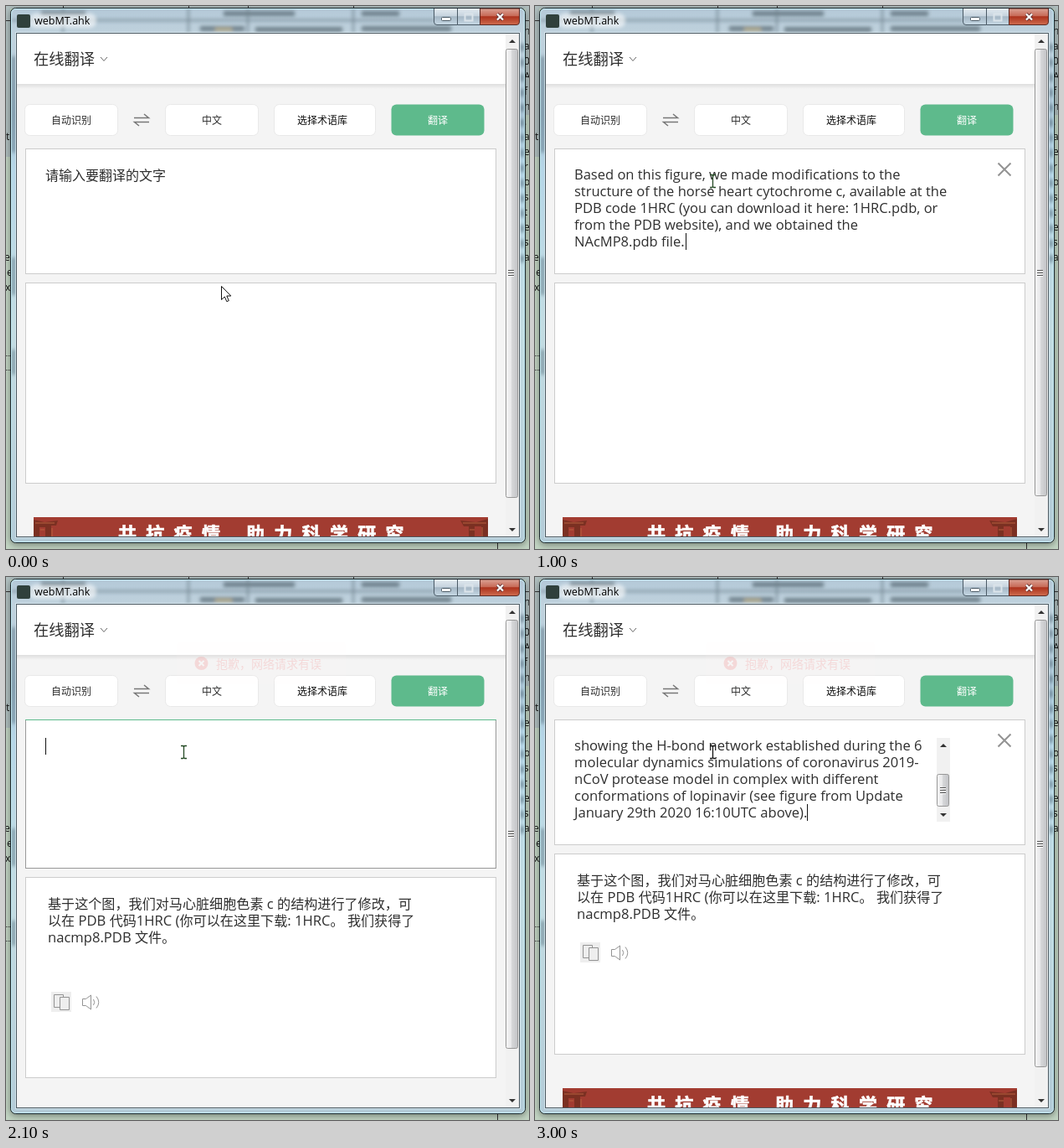
Write an HTML page that moves like this. It is 625 px wide and 648 px high and loops after 3100 ms.

```html
<!DOCTYPE html>
<html lang="zh-CN">
<head>
<meta charset="utf-8">
<title>webMT.ahk</title>
<style>
  html, body { margin: 0; width: 100%; height: 100%; overflow: hidden; background: #c3d6c4; }
  svg { display: block; width: 625px; height: 648px; }
  text { font-family: "Open Sans", "Noto Sans CJK SC", "Noto Sans CJK", sans-serif; fill: #2e2e2e; white-space: pre; }
  .small { font-size: 12px; }
  .copy { font-size: 16.5px; }
  .second .copy { font-size: 16.6px; }
  .cjk { font-size: 16px; }
  .result .cjk { font-size: 16.1px; }
  .cjk .latin { font-size: 16.6px; }
  .slogan { font-size: 22px; font-weight: 900; letter-spacing: 11.3px; fill: #fff; stroke: #fff; stroke-width: .7; }
  .line { fill: none; stroke: #939393; }
  .caret { fill: #111; }
  .desk { font-size: 12px; fill: #111; }

  .a { animation: 3100ms step-end infinite; }
  .show { opacity: 0; }

  .arrow { animation-name: arrow; }
  @keyframes arrow { 0% { opacity: 1 } 6.45% { opacity: 0 } }
  .ibeam { animation-name: ibeam; stroke: #244a24; }
  @keyframes ibeam { 6.45% { opacity: 1 } 77.41% { opacity: 1; stroke: #111 } }
  .hint { animation-name: hint; }
  @keyframes hint { 0% { opacity: 1 } 9.67% { opacity: 0 } }
  .focus { animation-name: focus; }
  @keyframes focus { 9.67% { opacity: 1 } 32.25% { opacity: 0 } 67.74% { opacity: 1 } 96.77% { opacity: 0 } }
  .caret-empty { animation-name: caretEmpty; }
  @keyframes caretEmpty { 9.67% { opacity: 1 } 29.03% { opacity: 0 } 67.74% { opacity: 1 } 90.32% { opacity: 0 } }
  .first { animation-name: first; }
  @keyframes first {
    29.03% { opacity: 1 }
    45.16% { opacity: 1; transform: translateY(1px) }
    67.74% { opacity: 0 }
  }
  .caret-first { animation-name: caretFirst; }
  @keyframes caretFirst { 29.03% { opacity: 1 } 48.38% { opacity: 0 } }
  .second { animation-name: second; }
  @keyframes second { 90.32% { opacity: 1 } }
  .clear { animation-name: clear; }
  @keyframes clear { 32.25% { opacity: 1 } 67.74% { opacity: 0 } 96.77% { opacity: 1 } }
  .result { animation-name: result; }
  @keyframes result { 61.29% { opacity: 1 } }
  .speaker { animation-name: speaker; }
  @keyframes speaker { 64.51% { opacity: 1 } }
  .toast { animation-name: toast; }
  @keyframes toast { 67.74% { opacity: .2 } }

  .input { animation-name: input; height: 149px; stroke: #ccc; }
  @keyframes input {
    9.67% { height: 149px; stroke: #999 }
    32.25% { height: 149px; stroke: #ccc }
    45.16% { height: 177px; stroke: #ccc }
    67.74% { height: 177px; stroke: #999 }
    70.96% { height: 151px; stroke: #999 }
    90.32% { height: 149px; stroke: #999 }
    96.77% { height: 149px; stroke: #ccc }
  }
  .below { animation-name: below; }
  @keyframes below {
    45.16% { transform: translateY(28px) }
    70.96% { transform: translateY(2px) }
    90.32% { transform: none }
  }
  .tools { animation-name: tools; }
  @keyframes tools {
    61.29% { transform: translateY(31px) }
    70.96% { transform: translateY(5px) }
    90.32% { transform: none }
  }
  .thumb { animation-name: thumb; height: 535px; }
  @keyframes thumb {
    12.9% { height: 533px }
    45.16% { height: 511px }
    70.96% { height: 533px }
  }
  .grip { animation-name: grip; }
  @keyframes grip {
    45.16% { transform: translateY(-12px) }
    70.96% { transform: translateY(-1px) }
    90.32% { transform: none }
  }
</style>
</head>
<body>
<svg viewBox="0 0 625 648">
  <defs>
    <linearGradient id="glass" x2="0" y2="1">
      <stop offset="0" stop-color="#b4c9d8"/>
      <stop offset=".05" stop-color="#c0d2dd"/>
      <stop offset=".2" stop-color="#a9c4d5"/>
      <stop offset=".3" stop-color="#b5d5e6"/>
      <stop offset=".6" stop-color="#c2dce2"/>
      <stop offset="1" stop-color="#b3cbd7"/>
    </linearGradient>
    <linearGradient id="red" x2="0" y2="1">
      <stop offset="0" stop-color="#dba294"/>
      <stop offset=".45" stop-color="#c76a57"/>
      <stop offset=".5" stop-color="#ac321c"/>
      <stop offset="1" stop-color="#cf6c4f"/>
    </linearGradient>
    <linearGradient id="button" x2="0" y2="1">
      <stop offset="0" stop-color="#e3ebf1"/>
      <stop offset=".45" stop-color="#c6d3de"/>
      <stop offset=".5" stop-color="#a5b7c5"/>
      <stop offset="1" stop-color="#c6d8e4"/>
    </linearGradient>
    <linearGradient id="bar">
      <stop offset="0" stop-color="#f5f5f5"/>
      <stop offset=".45" stop-color="#e8e8ea"/>
      <stop offset=".5" stop-color="#d6d7d9"/>
      <stop offset="1" stop-color="#c3c4c7"/>
    </linearGradient>
    <linearGradient id="shade" x2="0" y2="1">
      <stop offset="0" stop-color="#000" stop-opacity=".09"/>
      <stop offset="1" stop-color="#000" stop-opacity="0"/>
    </linearGradient>
    <filter id="blur" x="-20%" y="-60%" width="140%" height="220%"><feGaussianBlur stdDeviation="2.2"/></filter>
    <filter id="soft" x="-5%" y="-5%" width="110%" height="110%"><feGaussianBlur stdDeviation="4"/></filter>
    <clipPath id="frame"><rect x="6" y="3" width="614" height="637" rx="6"/></clipPath>
    <clipPath id="page"><rect x="13" y="33" width="584" height="600"/></clipPath>
    <g id="ridges"><path d="M-3-2.5h7M-3 .5h7M-3 3.5h7" stroke="#555"/><path d="M-3-1.5h7M-3 1.5h7M-3 4.5h7" stroke="#fff"/></g>
    <path id="up" d="M-4 2L0-2L4 2Z" fill="#333"/>
  </defs>

  <!-- desktop -->
  <rect width="625" height="648" fill="#c3d6c4"/>
  <path d="M0 0H625V130H621V3H5V180H0Z" fill="#b2c1c1"/>
  <path d="M68.500 0V4M218.500 0V4M289.500 0V4M415.500 0V4M0 17.500H6M620 17.500H625M587.500 641V648" stroke="#333"/>
  <path d="M0 417.500H6M0 434.500H6" stroke="#333" stroke-dasharray="1 1"/>
  <text class="desk"><tspan x="0" y="160">t</tspan><tspan x="-2" y="304">er</tspan><tspan x="-2" y="322">le</tspan><tspan x="-1" y="340">x</tspan></text>
  <text class="desk"><tspan x="619" y="34">n</tspan><tspan x="619" y="52">a</tspan><tspan x="619" y="70">0</tspan><tspan x="619" y="88">A</tspan><tspan x="619" y="106">f</tspan><tspan x="619" y="124">n</tspan><tspan x="619" y="142">.</tspan><tspan x="619" y="160">a</tspan><tspan x="619" y="178">e</tspan><tspan x="619" y="196">r</tspan><tspan x="619" y="214">o</tspan><tspan x="619" y="232">s</tspan><tspan x="619" y="250">t</tspan><tspan x="619" y="268">e</tspan><tspan x="619" y="286">s</tspan><tspan x="619" y="304">a</tspan></text>
  <rect x="5" y="4" width="616" height="639" rx="6" fill="#000" opacity=".42" filter="url(#soft)"/>

  <!-- window frame -->
  <g clip-path="url(#frame)">
    <rect x="6" y="3" width="614" height="637" fill="url(#glass)"/>
    <g filter="url(#blur)" opacity=".6">
      <path d="M6 17H512M68 3V32M218 3V32M289 3V32M415 3V32" stroke="#4d5f6a" stroke-width="2"/>
      <path d="M42 9H95M260 9H345M425 9H470M232 27H285M298 28H402M425 27H532" stroke="#43525c" stroke-width="6"/>
      <path d="M250 28H270" stroke="#a48b4e" stroke-width="4"/>
      <path d="M617 45V310" stroke="#4c6472" stroke-width="5" stroke-dasharray="9 9"/>
      <path d="M9 60V175M9 300V345M9 410V440" stroke="#54707f" stroke-width="5"/>
    </g>
    <rect x="28" y="9" width="80" height="17" rx="8" fill="#fff" opacity=".6" filter="url(#blur)"/>
  </g>
  <rect x="5.500" y="2.500" width="615" height="638" rx="6" fill="none" stroke="#1d282e"/>
  <rect x="6.500" y="3.500" width="613" height="636" rx="5" fill="none" stroke="#c9f3fb" opacity=".85"/>
  <rect x="11.500" y="31.500" width="603" height="603" fill="none" stroke="#e6f3f8" opacity=".6"/>
  <rect x="13" y="10" width="16" height="16" rx="2" fill="#30403c"/>
  <text x="34" y="22" font-size="12.500" style="fill:#000">webMT.ahk</text>
  <g stroke="#4a5a66">
    <path d="M511.500 3V19Q511.500 22.500 515 22.500H539.500V3" fill="url(#button)"/>
    <path d="M539.500 3V22.500H566.500V3" fill="url(#button)"/>
    <path d="M566.500 3V22.500H610Q613.500 22.500 613.500 19V3Z" fill="url(#red)" stroke="#5c2b25"/>
    <rect x="520.500" y="13.500" width="11" height="4" rx="1" fill="#fff"/>
    <path d="M548.500 9.500H557.500V17.500H548.500Z" fill="none" stroke="#dbe4ea" stroke-width="2"/>
  </g>
  <path d="M587 9.500L594 16.500M594 9.500L587 16.500" stroke="#633" stroke-width="4"/>
  <path d="M587 9.500L594 16.500M594 9.500L587 16.500" stroke="#fff" stroke-width="2.300"/>
  <rect x="12.500" y="32.500" width="601" height="601" fill="#f4f4f4" stroke="#4c5a62"/>

  <!-- page -->
  <g clip-path="url(#page)">
    <rect x="13" y="93" width="584" height="6" fill="url(#shade)"/>
    <rect x="13" y="33" width="584" height="60" fill="#fff"/>
    <text x="33" y="70" font-size="18.300">在线翻译</text>
    <path d="M113 61L117 65.500L121 61" class="line" style="stroke:#666"/>

    <g fill="#fff" stroke="#e9e9e9">
      <rect x="22.500" y="117.500" width="111" height="37" rx="6"/>
      <rect x="190.500" y="117.500" width="111" height="37" rx="6"/>
      <rect x="320.500" y="117.500" width="121" height="37" rx="6"/>
    </g>
    <rect x="460.500" y="117.500" width="111" height="37" rx="6" fill="#5eba8c"/>
    <g class="small">
      <text x="54" y="141">自动识别</text>
      <text x="234" y="141">中文</text>
      <text x="348" y="141" style="fill:#111">选择术语库</text>
      <text x="504" y="141" style="fill:#fff">翻译</text>
    </g>
    <path d="M153 133.500H170.500L165 129M171 138.500H153.500L159 143" class="line" style="stroke:#777" stroke-width="1.500"/>

    <g class="a show toast">
      <rect x="204" y="78" width="202" height="50" rx="4" fill="#fef0f0" opacity=".4"/>
      <circle cx="233.500" cy="103" r="8" fill="#f56c6c"/>
      <path d="M230.500 100L236.500 106M236.500 100L230.500 106" stroke="#fff" stroke-width="2"/>
      <text x="251" y="109" font-size="14" style="fill:#f56c6c">抱歉，网络请求有误</text>
    </g>

    <rect class="a input" x="23.500" y="170.500" width="562" fill="#fff"/>
    <path class="a show focus" d="M23 170.500H586" stroke="#5eba8c"/>
    <text class="a show hint cjk" x="47" y="208">请输入要翻译的文字</text>
    <rect class="a show caret caret-empty" x="47" y="192" width="1" height="20"/>

    <g class="a show first">
      <text class="copy"><tspan x="47" y="207">Based on this figure, we made modifications to the</tspan><tspan x="47" y="227">structure of the horse heart cytochrome c, available at the</tspan><tspan x="47" y="247">PDB code 1HRC (you can download it here: 1HRC.pdb, or</tspan><tspan x="47" y="267">from the PDB website), and we obtained the</tspan><tspan x="47" y="287">NAcMP8.pdb file.</tspan></text>
      <rect class="a show caret caret-first" x="180" y="271" width="1" height="20"/>
    </g>

    <g class="a show second">
      <text class="copy"><tspan x="47" y="207">showing the H-bond network established during the 6</tspan><tspan x="47" y="227">molecular dynamics simulations of coronavirus 2019-</tspan><tspan x="47" y="247">nCoV protease model in complex with different</tspan><tspan x="47" y="267">conformations of lopinavir (see figure from Update</tspan><tspan x="47" y="287">January 29th 2020 16:10UTC above).</tspan></text>
      <rect class="caret" x="325" y="271" width="1" height="20"/>
      <rect x="480" y="192" width="16" height="100" fill="#f1f1f1"/>
      <rect x="480.500" y="235.500" width="14" height="38" rx="2" fill="url(#bar)" stroke="#979797"/>
      <use href="#ridges" x="487" y="254"/>
      <use href="#up" x="488" y="201"/>
      <use href="#up" transform="translate(488 284) scale(1 -1)"/>
    </g>
    <path class="a show clear line" d="M553.500 187.500L568.500 202.500M568.500 187.500L553.500 202.500" stroke-width="2"/>

    <g class="a below">
      <rect x="23.500" y="330.500" width="562" height="239" fill="#fff" stroke="#ccc"/>
      <g class="a show result">
        <text class="cjk" x="50" y="368">基于这个图，我们对马心脏细胞色素<tspan class="latin"> c </tspan>的结构进行了修改，可</text>
        <text class="cjk" x="50" y="388">以在<tspan class="latin"> PDB </tspan>代码<tspan class="latin">1HRC (</tspan>你可以在这里下载<tspan class="latin">: 1HRC</tspan>。<tspan class="latin"> </tspan>我们获得了</text>
        <text class="cjk" x="50" y="408"><tspan class="latin">nacmp8.PDB </tspan>文件。</text>
        <g class="a tools">
          <rect x="54" y="436" width="24" height="24" fill="#eee"/>
          <path class="line" d="M64 454.500H57.500V439.500H68.500V442M64.500 442.500H75.500V457.500H64.500Z"/>
          <path class="a show speaker line" d="M91.500 444.500H95.500L101.500 440V457L95.500 452.500H91.500ZM104.500 445Q107 448.500 104.500 452M108 441.500Q113.500 448.500 108 455.500"/>
        </g>
      </g>

      <!-- banner -->
      <rect x="33" y="610" width="543" height="40" fill="#a23c31"/>
      <g fill="#7b3022">
        <path d="M33 613L46 616L62 614L60 620H54V634H47V622H40V634H33Z"/>
        <path d="M576 612L562 616L543 614L547 621H553V634H560V621H568V634H576Z"/>
      </g>
      <path d="M35 617H58M41 625H46M55 623V634M546 617H574M554 625H560M569 622V634" stroke="#b8613f" fill="none"/>
      <text class="slogan" x="134" y="638">共抗疫情</text>
      <text class="slogan" x="287" y="638">助力科学研究</text>
    </g>
  </g>

  <!-- window scroll bar -->
  <rect x="597" y="33" width="16" height="600" fill="#f1f1f1"/>
  <rect class="a thumb" x="597.500" y="51.500" width="14" rx="2" fill="url(#bar)" stroke="#979797"/>
  <g class="a grip"><use href="#ridges" x="603" y="318"/></g>
  <use href="#up" x="605" y="42"/>
  <use href="#up" transform="translate(605 625) scale(1 -1)"/>

  <!-- pointers -->
  <path class="a show arrow" d="M257.500 334.500V350.500L261.300 347L263.800 352.700L266.300 351.600L263.800 346H268.800Z" fill="#fff" stroke="#111"/>
  <path class="a show ibeam" d="M209 201.500H211.500L212.500 202.500L213.500 201.500H216M212.500 202V216M209 216.500H211.500L212.500 215.500L213.500 216.500H216" fill="none" stroke-width="1.300"/>
</svg>
</body>
</html>
```
